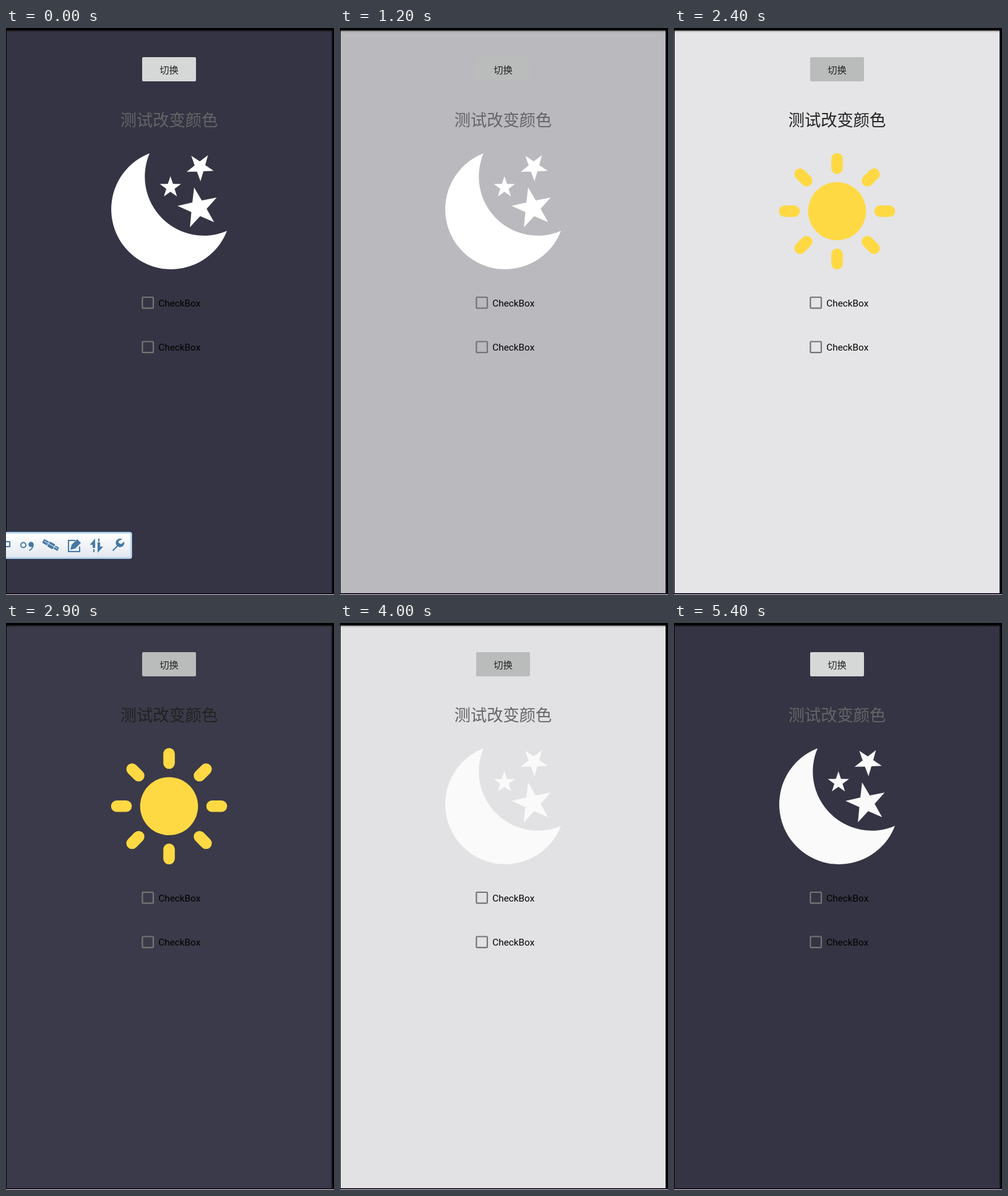
Recreate the animation shown at these times as an HTML page. Size 530x914 px, loop 5.8 s.

```html
<!DOCTYPE html>
<html lang="zh-CN">
<head>
<meta charset="utf-8">
<title>Day and night switch</title>
<style>
  html, body { margin: 0; width: 100%; height: 100%; overflow: hidden; background: #000; }
  svg { display: block; width: 530px; height: 914px; }
  text { font-family: Roboto, "Noto Sans CJK SC", "Noto Sans CJK JP", "Noto Sans CJK", sans-serif; font-size: 15.3px; }
  .mid { text-anchor: middle; }
  #title { font-size: 26.25px; }
  .box { fill: none; stroke: #757575; stroke-width: 2.2; }
  .ray { stroke: #ffd943; stroke-width: 18.6; stroke-linecap: round; }
  .line { fill: none; stroke: #4679a6; stroke-width: 2; }
  .solid { fill: #4679a6; }
</style>
</head>
<body>
<svg viewBox="0 0 530 914">
  <defs>
    <linearGradient id="shade" x2="0" y2="1">
      <stop stop-color="#000" stop-opacity=".4"/>
      <stop offset="1" stop-color="#000" stop-opacity="0"/>
    </linearGradient>
    <linearGradient id="gloss" x2="0" y2="1">
      <stop stop-color="#fff"/>
      <stop offset="1" stop-color="#e3e8f0"/>
    </linearGradient>
    <g id="check">
      <rect class="box" x="220.4" y="434" width="17.6" height="17.6" rx="1.2"/>
      <text x="246.3" y="448.7">CheckBox</text>
    </g>
  </defs>

  <rect width="530" height="914"/>
  <rect id="page" x="1" y="4" width="525" height="907"/>
  <rect x="1" y="4" width="525" height="3" fill="url(#shade)"/>
  <rect x="526" y="4" width="2" height="907" fill="#17121c"/>
  <rect y="911" width="530" height="2" fill="#1a1222"/>
  <rect y="913" width="530" height="1" fill="#ddd5e0"/>

  <rect id="button" x="220" y="47" width="87" height="39" rx="2"/>
  <text class="mid" x="263.6" y="72.8" fill="#222">切换</text>
  <text class="mid" id="title" x="263.4" y="158.4">测试改变颜色</text>

  <g id="moon">
    <path d="M232 202A96.7 96.7 0 1 0 357 327A95.2 95.2 0 0 1 232 202Z"/>
  </g>
  <g id="sun">
    <circle cx="263.5" cy="295.3" r="46.8" fill="#ffd943"/>
  </g>

  <use href="#check"/>
  <use href="#check" y="71.5"/>

  <g id="bar">
    <rect x="-6" y="812.5" width="209.5" height="43" rx="3.5" fill="#dcebf8" stroke="#6f9cc8"/>
    <rect x="-6" y="814.5" width="207.5" height="39" rx="2.5" fill="url(#gloss)" stroke="#a9c6e2"/>
    <path class="line" d="M-2 828H6V836H-2"/>
    <circle class="line" cx="28" cy="833.5" r="4"/>
    <circle class="solid" cx="40.5" cy="832.5" r="4.2"/>
    <path class="line" d="M43.6 832Q44.5 839 37.5 842" stroke-width="2.5"/>
    <g transform="translate(72 834) rotate(29)">
      <rect class="solid" x="-14" y="-4" width="9" height="7" rx="1"/>
      <rect class="solid" x="-4" y="-5" width="10" height="9" rx="1"/>
      <rect class="solid" x="7" y="-3.5" width="7" height="6" rx="1"/>
      <path d="M-12 -1H12" stroke="#d5e4f1"/>
    </g>
    <path class="line" d="M112 826H101V844H119V836"/>
    <path class="solid" d="M104 841L106 833L115 824L121 830L112 839Z"/>
    <path class="solid" d="M144 823V838H140V833H135.500ZM148 846V829H152V836H157Z"/>
    <path class="line" d="M142 840V845M150 823V828" stroke-width="4"/>
    <path class="line" d="M173 842L183 832" stroke-width="5.500" stroke-linecap="round"/>
    <path class="solid" d="M188 824A7 7 0 1 0 191 828L186 832L182 830L182 827Z"/>
  </g>
</svg>
<script>
const LOOP = 5800, STEP = 100, FADE = 600;
const NIGHT = [52, 52, 68], DAY = [230, 230, 232];
const fadeStarts = [802, 2371, 3458, 4741];
const swaps = [1500, 3000, 4100, 5400];
const presses = [[700, 1500], [2100, 3000], [3300, 4200], [4600, 5400]];

const el = id => document.getElementById(id);
const [page, button, title, moon, sun, bar] =
  ["page", "button", "title", "moon", "sun", "bar"].map(el);

function add(parent, tag, attrs) {
  const node = document.createElementNS("http://www.w3.org/2000/svg", tag);
  for (const name in attrs) node.setAttribute(name, attrs[name]);
  parent.append(node);
}

function addStar(x, y, radius, turn) {
  const points = Array.from({ length: 10 }, (_, i) => {
    const a = (turn + i * 36) * Math.PI / 180;
    const r = i % 2 ? radius * 0.39 : radius;
    return `${x + r * Math.cos(a)},${y + r * Math.sin(a)}`;
  });
  add(moon, "polygon", { points: points.join(" ") });
}

addStar(313.5, 224, 23, 88);
addStar(265.7, 257, 18, -90);
addStar(311, 290.2, 34, -102);
for (let a = 0; a < 360; a += 45)
  add(sun, "path", { class: "ray", d: "M0 -69.5V-84.5", transform: `translate(263.5 295.3) rotate(${a})` });

const ease = p => (1 - Math.cos(Math.PI * Math.min(1, Math.max(0, p)))) / 2;
const show = (node, on) => node.style.display = on ? "" : "none";

function draw(t) {
  // Fades alternate: towards day, then back to night.
  const light = fadeStarts.reduce((sum, start, i) =>
    sum + (i % 2 ? -1 : 1) * ease((t - start) / FADE), 0);
  const rgb = NIGHT.map((c, i) => Math.round(c + (DAY[i] - c) * light));
  const isDay = swaps.filter(s => t >= s).length % 2 === 1;
  const pressed = presses.some(([from, to]) => t >= from && t < to);

  page.setAttribute("fill", `rgb(${rgb})`);
  button.setAttribute("fill", pressed ? "#babcbb" : "#d6d8d8");
  title.setAttribute("fill", isDay ? "#222" : "#656567");
  moon.setAttribute("fill", t < swaps[0] ? "#fff" : "#fafafa");
  show(moon, !isDay);
  show(sun, isDay);
  show(bar, t < presses[0][0]);
}

const begin = performance.now();
function tick() {
  const t = (performance.now() - begin) % LOOP;
  draw(Math.floor(t / STEP) * STEP);
  requestAnimationFrame(tick);
}
tick();
</script>
</body>
</html>
```
